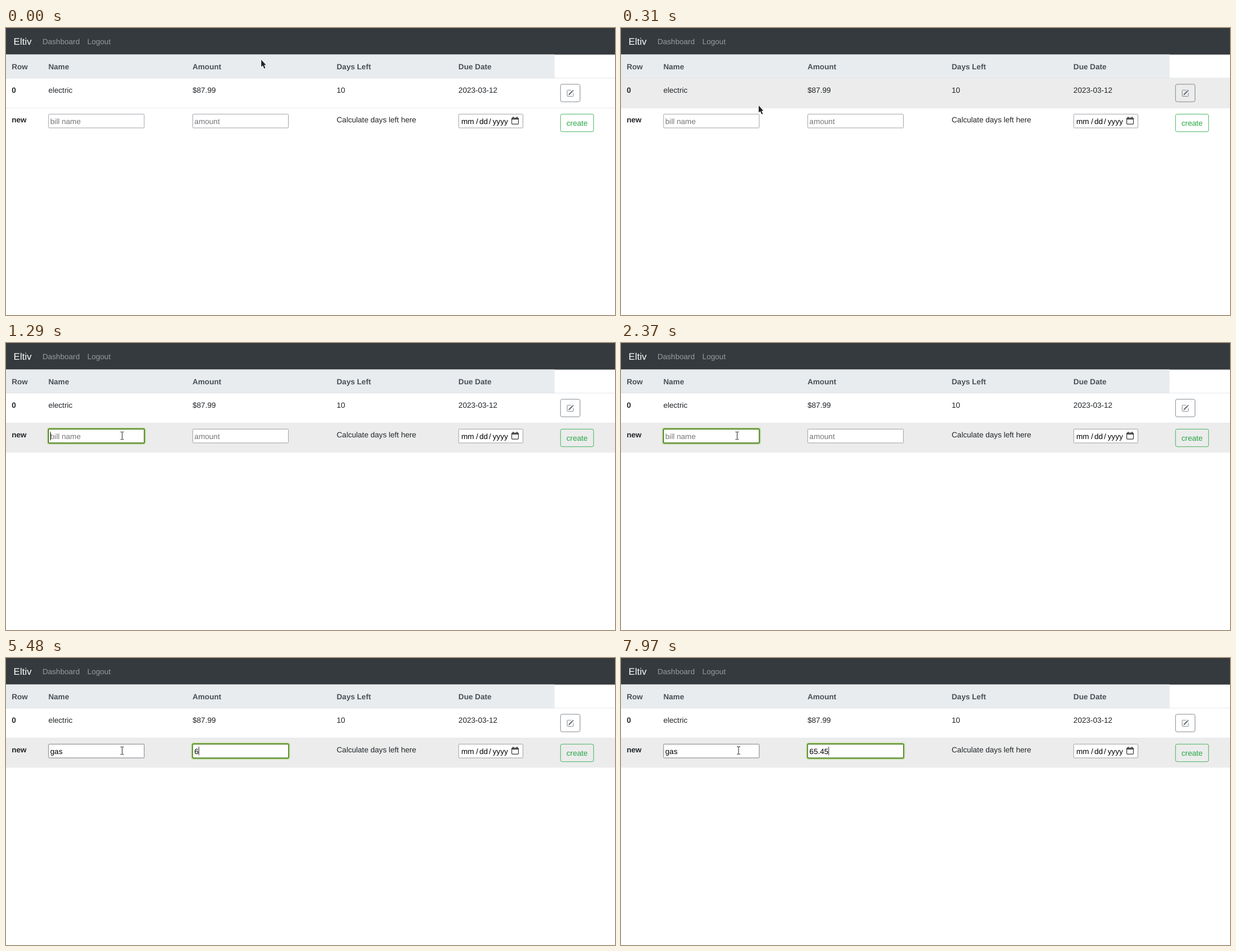
Animation of 1088x514 px, one loop 8 s. Source, as an HTML page:

```html
<!DOCTYPE html>
<html lang="en">
<head>
<meta charset="utf-8">
<title>Bills</title>
<style>
  html, body { margin: 0; width: 100%; height: 100%; overflow: hidden; background: #fff; }
  svg { display: block; width: 100%; height: 100%; }
  text { font: 16px "Liberation Sans", Arial, sans-serif; fill: #212529; text-rendering: geometricPrecision; white-space: pre; }
  .bold text, text.bold { font-weight: 700; }
  .head text { fill: #495057; }
  .nav text { fill: #999c9e; }
  .nav .brand { font-size: 20px; fill: #fff; }
  .field rect { fill: #fff; stroke: #8f8f9d; }
  .field .hover { stroke: #676774; }
  .field text { fill: #000; }
  .field .hint { fill: #757575; }
  .line { stroke: #dee2e6; }
  .row { fill: #ececec; }
</style>
</head>
<body>
<svg viewBox="0 0 1088 514">
  <g transform="scale(.85)">
    <rect width="1280" height="56" fill="#343a3d"/>
    <g class="nav">
      <text class="brand" x="16" y="35">Eltiv</text>
      <text x="76.7" y="34">Dashboard</text>
      <text x="171" y="34">Logout</text>
    </g>

    <rect y="56" width="1153" height="50" fill="#e8ecee"/>
    <rect class="row" id="row0" y="106" width="1280" height="62"/>
    <rect class="row" id="row1" y="169" width="1280" height="62"/>
    <path class="line" d="M0 56.5h1153M0 105.5h1280M0 168.5h1280"/>

    <g class="head bold">
      <text x="12" y="87">Row</text>
      <text x="89" y="87">Name</text>
      <text x="392" y="87">Amount</text>
      <text x="695" y="87">Days Left</text>
      <text x="951" y="87">Due Date</text>
    </g>
    <text class="bold" x="12" y="137">0</text>
    <text x="89" y="137">electric</text>
    <text x="392" y="137">$87.99</text>
    <text x="695" y="137">10</text>
    <text x="951" y="137">2023-03-12</text>
    <text class="bold" x="12" y="199">new</text>
    <text x="695" y="199">Calculate days left here</text>

    <g class="field">
      <rect id="nameBox" x="89.5" y="181.5" width="201" height="29" rx="1.5"/>
      <text id="name" x="93" y="202"></text>
      <rect x="392.5" y="181.5" width="201" height="29" rx="1.5"/>
      <text id="amount" x="396" y="202"></text>
      <rect x="951.5" y="181.5" width="135" height="29" rx="1.5"/>
      <text x="957" y="202">mm</text>
      <text x="988" y="202">/</text>
      <text x="995" y="202">dd</text>
      <text x="1015" y="202">/</text>
      <text x="1023" y="202">yyyy</text>
    </g>
    <g fill="none" stroke="#333" stroke-width="1.4">
      <rect x="1063" y="189.5" width="14" height="13" rx="1.5"/>
      <path d="M1063 191.5h14M1066 187v2.500M1074 187v2.500" stroke-width="2"/>
    </g>

    <rect x="1165.5" y="118.5" width="41" height="37" rx="3.5" fill="none" stroke="#6c757d"/>
    <g transform="translate(1178 129.500)" fill="none" stroke="#6c757d">
      <path d="M9.500 1.500h-7q-1 0-1 1v11q0 1 1 1h11q1 0 1-1v-6"/>
      <path d="M5.500 10.500L12.800 3.200M13.300 2.700l1.200-1.200" stroke-width="2.800"/>
      <path d="M4 12.200l.9-2.900 2 2z" fill="#6c757d" stroke="none"/>
    </g>
    <rect x="1165.5" y="181.5" width="69.500" height="37" rx="3.5" fill="none" stroke="#28a745"/>
    <text x="1178" y="206" style="fill:#28a745">create</text>

    <g id="focus" fill="none" stroke-width="2">
      <rect x="87" y="179" width="206" height="34" rx="4" stroke="#c4dca8"/>
      <rect x="89" y="181" width="202" height="30" rx="2.500" stroke="#4a8510"/>
    </g>
    <rect id="caret" y="187" width="1" height="18" fill="#000"/>
  </g>

  <path id="arrow" d="M0 0V12.500L2.800 10 5.300 15.500 7.300 14.600 5 9.200H8.500Z" fill="#222" stroke="#fff" stroke-width=".8" paint-order="stroke"/>
  <path id="beam" d="M-3-6.700h2q1 0 1 1v11.400q0 1-1 1h-2M3-6.700h-2q-1 0-1 1M3 6.700h-2q-1 0-1-1" fill="none" stroke="#222"/>
</svg>
<script>
const LOOP = 8000;
const el = id => document.getElementById(id);
const show = (id, on) => el(id).setAttribute("visibility", on ? "visible" : "hidden");
const move = (id, x, y) => el(id).setAttribute("transform", `translate(${x} ${y})`);
const at = (steps, t) => steps.findLast(s => s[0] <= t);

// time, pointer x, y
const pointer = [
  [0, 456, 57], [80, 432, 66], [160, 372, 88], [230, 298, 117], [310, 246, 139], [390, 224, 151],
  [470, 213, 160], [550, 209, 164], [620, 208, 166], [700, 207.5, 166], [7970, 210, 165.5]
];

// time, focused field, its text, caret visible
const typing = [
  [0, "", "", 0],
  [1290, "name", "", 1], [2370, "name", "", 0], [2790, "name", "ga", 1], [2870, "name", "gas", 1],
  [3210, "amount", "", 1], [4470, "amount", "", 0], [5480, "amount", "6", 1], [5640, "amount", "6", 0],
  [5970, "amount", "65", 1], [6220, "amount", "65.", 1], [6720, "amount", "65.", 0],
  [6800, "amount", "65.4", 1], [6880, "amount", "65.45", 1]
];
const hints = { name: "bill name", amount: "amount" };

function setField(id, value) {
  el(id).textContent = value || hints[id];
  el(id).classList.toggle("hint", !value);
}

function draw(t) {
  const [, x, y] = at(pointer, t);
  const inField = y > 154;
  show("row0", y >= 90 && y < 143);
  show("row1", y >= 143);
  show("arrow", !inField);
  show("beam", inField);
  el("nameBox").classList.toggle("hover", inField);
  move(inField ? "beam" : "arrow", x, y);

  const [, field, value, caret] = at(typing, t);
  setField("name", field === "amount" ? "gas" : value);
  setField("amount", field === "amount" ? value : "");
  show("focus", field);
  show("caret", caret);
  if (!field) return;
  move("focus", field === "amount" ? 303 : 0, 0);
  const start = +el(field).getAttribute("x");
  const width = value ? el(field).getComputedTextLength() : 0;
  el("caret").setAttribute("x", Math.round(start + width));
}

const begin = performance.now();
function tick() {
  draw((performance.now() - begin) % LOOP);
  requestAnimationFrame(tick);
}
tick();
</script>
</body>
</html>
```
